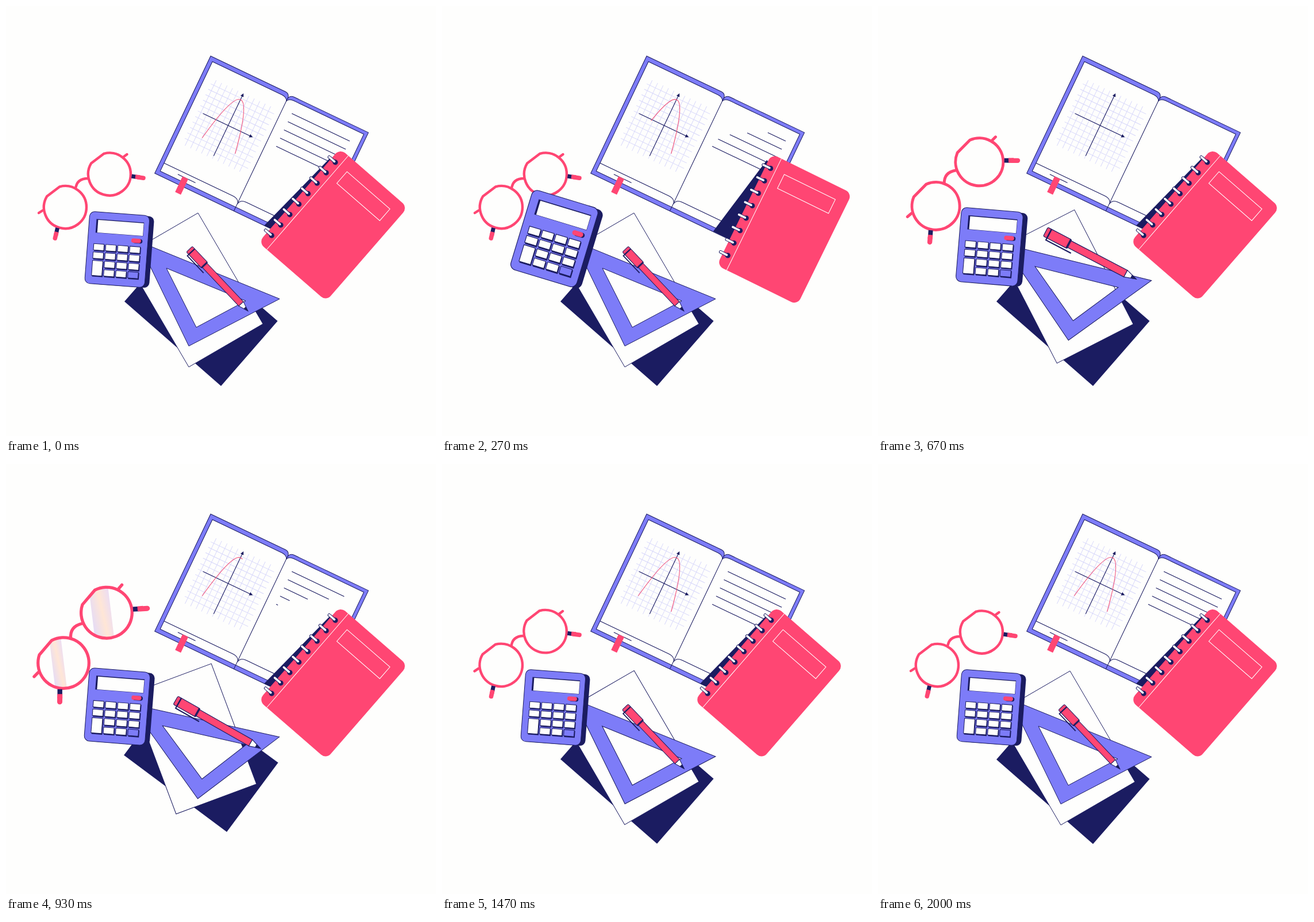
These frames come from a looping animation (748x748 px, 2.03 s). An HTML page:

```html
<!DOCTYPE html>
<html lang="en">
<head>
<meta charset="utf-8">
<title>Study desk</title>
<style>
  html, body { margin: 0; width: 100%; height: 100%; overflow: hidden; background: #fefefd; }
  svg { display: block; width: 100vw; height: 100vh; }
  .navy { fill: #1b1c61; }
  .blue { fill: #7d7cf8; }
  .pink { fill: #ff4673; }
  .white { fill: #fefefd; }
  .edge { stroke: #1b1c61; stroke-width: 1; }
  .line { fill: none; stroke: #1b1c61; stroke-width: 1.1; }
  .rim { fill: none; stroke: #ff4673; stroke-width: 4.4; }
</style>
</head>
<body>
<svg viewBox="0 0 748 748">
  <defs>
    <linearGradient id="shine">
      <stop offset="0" stop-color="#e2dafa"/>
      <stop offset=".55" stop-color="#ffe6d6"/>
      <stop offset="1" stop-color="#eadcf6"/>
    </linearGradient>
    <path id="lens" d="M-31.7-19.1 L-9.6-35.7 A37 37 0 1 1 -31.7-19.1Z"/>
    <clipPath id="lensClip"><use href="#lens"/></clipPath>
  </defs>

  <g transform="translate(356 87) rotate(25.5)">
    <path class="blue edge" d="M0 0H144Q152 0 153 9Q154 2 162 2H305V226H0Z"/>
    <path class="white edge" d="M7 7.5H141Q150 7.5 152.5 14Q155 8 164 8H299V218.5H7Z"/>
    <path class="line" d="M152.5 8V226M7 203H140Q150 203 153 211Q155 203 165 203H299M37 210.3H71"/>
    <rect class="pink" x="46" y="210" width="11" height="30"/>
    <path id="grid" fill="none" stroke="#d6d6fa" stroke-width=".9"/>
    <path class="line" d="M31 96H124M79.5 154.5V38"/>
    <path class="navy" d="M127 96l-6-3v6zM79.5 34l-3 6h6z"/>
    <path id="curve" pathLength="1" fill="none" stroke="#f0567f" stroke-width="1.2" d="M48 135Q79.8-43 111.6 135"/>
    <g id="text"></g>
  </g>

  <polygon id="shade" class="navy"/>

  <g id="notebook">
    <g transform="translate(581 248) rotate(41)">
      <rect class="pink" width="156" height="216" rx="12"/>
      <path fill="none" stroke="#fff" stroke-width="1" d="M19 0V216M35.5 22.3h99v27h-99z"/>
      <g id="rings"></g>
    </g>
  </g>

  <g id="glasses">
    <g transform="translate(103 350)">
      <g clip-path="url(#lensClip)"><path class="glint" fill="url(#shine)" d="M-5-45h17L3 45h-17z"/></g>
      <use href="#lens" class="rim"/>
    </g>
    <g transform="translate(180 292.5)">
      <g clip-path="url(#lensClip)"><path class="glint" fill="url(#shine)" d="M-10-45h28L9 45h-28z"/></g>
      <use href="#lens" class="rim"/>
    </g>
    <path class="rim" d="M121 318Q123 300 142.500 300"/>
    <path class="rim" stroke-linecap="round" d="M205 262l5.500-4M64 355.500l-7 4.500"/>
    <path fill="none" stroke="#1b1c61" stroke-width="7" d="M218.500 296l9 1.500M89.500 386l-2 9"/>
    <path fill="none" stroke="#ff4673" stroke-width="7.500" d="M225 297l8 1M88 393l-1.500 6"/>
    <path fill="none" stroke="#ff4673" stroke-width="7.500" stroke-linecap="round" d="M229 297.800l10 1.500M87 397l-1.700 7"/>
  </g>

  <g id="folder"><path class="navy" d="M206 514L374 661L472.500 548L304 402Z"/></g>
  <g id="sheet"><path class="white edge" d="M334 360L447 553L318 628L205 435Z"/></g>
  <g id="triangle">
    <path class="blue edge" fill-rule="evenodd" d="M229.500 409L476 509.500L318 591.500ZM279 456L331 559L417 513Z"/>
  </g>

  <g id="pen">
    <g transform="translate(319 423) rotate(46.600)">
      <path class="line" stroke-width="1.600" style="stroke-width:1.8" d="M6 5V10.500H47"/>
      <rect class="pink edge" x="36" y="-5.500" width="95" height="11"/>
      <rect class="pink edge" x="0" y="-7.200" width="39" height="14.400" rx="2"/>
      <path class="line" style="stroke-width:2.2" d="M6-7V7M37.500-7V7"/>
      <path class="white edge" d="M131-5.500L148 0L131 5.500Z"/>
      <path class="navy" d="M140-3L149.500 0L140 3Z"/>
    </g>
  </g>

  <g id="calculator">
    <g transform="translate(146 357) rotate(4.300)">
      <rect class="navy" x="8" y="1" width="104.500" height="124.500" rx="9"/>
      <rect class="blue edge" width="104.500" height="125.500" rx="9"/>
      <rect class="navy" x="12.500" y="12.500" width="83" height="24"/>
      <rect class="white" x="15.500" y="14" width="79.500" height="22"/>
      <rect class="navy" x="78" y="42" width="17" height="7.500" rx="3.700"/>
      <rect class="pink" x="75.500" y="41.500" width="17" height="7.500" rx="3.700"/>
      <g id="keys"></g>
    </g>
  </g>
</svg>
<script>
const LOOP = 2030;
const $ = id => document.getElementById(id);
const range = n => [...Array(n).keys()];
const clamp = x => Math.min(1, Math.max(0, x));
const easeOut = x => 1 - (1 - clamp(x)) ** 2;
const easeInOut = x => (x = clamp(x)) < .5 ? 2 * x * x : 1 - 2 * (1 - x) ** 2;

$('grid').setAttribute('d',
  range(11).map(i => `M${27 + i * 10.5} 34V160`).join('') +
  range(11).map(i => `M21 ${43.5 + i * 10.5}H143`).join(''));

$('text').innerHTML = range(5).map(i =>
  `<path class="line" pathLength="1" d="M170.5 ${29.5 + i * 15.8}h111.5"/>`).join('');

$('rings').innerHTML = range(8).map(i => `<g transform="translate(9.500 ${23.4 + i * 24.1})" stroke-linecap="round">
  <circle class="navy" r="4.600"/>
  <path d="M-14 0H-2" stroke="#1b1c61" stroke-width="5.500"/>
  <path d="M-14 0H-2" stroke="#fff" stroke-width="3.600"/></g>`).join('');

const key = (col, row, height = 11, fill = 'white') => {
  const x = 11 + col * 21, y = 55.5 + row * 14.7;
  return `<rect class="navy" x="${x + 1}" y="${y + 1}" width="18.500" height="${height + 1}"/>
    <rect class="${fill} edge" x="${x}" y="${y}" width="18" height="${height}"/>`;
};
$('keys').innerHTML = range(16).map(i => {
  const col = i % 4, row = i >> 2;
  if (col === 0 && row === 3) return '';
  if (col === 0 && row === 2) return key(0, 2, 26);
  return key(col, row, 11, i === 15 ? 'blue' : 'white');
}).join('');

// Monotone cubic interpolation through rows of [time, ...values].
function sample(rows, t) {
  const last = rows.length - 1;
  if (t <= rows[0][0]) return rows[0].slice(1);
  if (t >= rows[last][0]) return rows[last].slice(1);
  const i = rows.findIndex(row => row[0] > t) - 1;
  const span = rows[i + 1][0] - rows[i][0], x = (t - rows[i][0]) / span;
  return rows[0].slice(1).map((_, n) => {
    const c = n + 1;
    const slope = j => (rows[j + 1][c] - rows[j][c]) / (rows[j + 1][0] - rows[j][0]);
    const tangent = j => {
      if (j === 0 || j === last) return 0;
      const a = slope(j - 1), b = slope(j);
      return a * b > 0 ? 2 * a * b / (a + b) : 0;
    };
    const from = rows[i][c], to = rows[i + 1][c];
    return from + (to - from) * x * x * (3 - 2 * x)
      + span * x * (1 - x) * (tangent(i) * (1 - x) - tangent(i + 1) * x);
  });
}

// Each key: time, shift x, shift y, rotation, scale.
const rest = t => [t, 0, 0, 0, 1];
const movers = {
  notebook: { at: [569, 380.7], keys: [rest(30), [285, 27, 8, -15, 1], rest(660)] },
  calculator: { at: [193.5, 423.5], keys: [rest(30), [285, 2, -19, 12.7, 1.15],
    [670, .5, -4.5, .5, 1.03], [930, 0, -1.5, .2, 1.015], [1170, 0, -.4, 0, 1.003], rest(1500)] },
  glasses: { at: [141.5, 321.2], keys: [rest(480), [670, -3, -11.7, -8.6, 1.122],
    [910, -4, -19.2, -12.7, 1.2], [1170, -2.5, -1.2, -6.8, 1.064], [1470, -.3, -.8, -.6, 1.006], rest(1800)] },
  pen: { at: [370, 477], keys: [rest(300), [670, .5, -43, -19, 1.2],
    [930, -1, -24, -17, 1.145], [1170, -.5, -8, -5.5, 1.045], [1470, 0, -.4, -.3, 1.003], rest(1650)] },
  triangle: { at: [397, 550.5], keys: [rest(400), [670, 6.5, -21, -8.3, 1],
    [810, 8, -24.5, -10.4, 1], [930, 7.5, -22, -9.7, 1], [1170, 1.5, -6, -2.2, 1], [1470, 0, -.5, -.2, 1], rest(1650)] },
  sheet: { at: [326, 494], keys: [rest(520), [670, .5, -6, 3.1, 1],
    [920, .5, -16, 9.8, 1], [1170, 0, -5, .8, 1], [1470, 0, -.6, .1, 1], rest(1650)] },
  folder: { at: [339, 531], keys: [rest(670), [920, 0, -18, -4.5, 1],
    [1170, 0, -3.5, -.3, 1], [1470, 0, -.5, 0, 1], rest(1650)] }
};

function trim(path, from, to) {
  path.style.visibility = to - from > .001 ? 'visible' : 'hidden';
  path.style.strokeDasharray = `0 ${from} ${to - from} 2`;
}

const textLines = [...$('text').children];
const glints = [...document.querySelectorAll('.glint')];

function draw(t) {
  for (const [id, { at: [x, y], keys }] of Object.entries(movers)) {
    const [dx, dy, angle, scale] = sample(keys, t);
    $(id).setAttribute('transform',
      `translate(${x + dx} ${y + dy}) rotate(${angle}) scale(${scale}) translate(${-x} ${-y})`);
  }

  const swing = sample(movers.notebook.keys, t)[2] / -15;
  $('shade').setAttribute('points',
    `${566 - swing} ${262 + 6 * swing} ${449 + 23 * swing} ${382 + 10 * swing} 534 423 585 290`);

  const writing = t > 700;
  textLines.forEach((line, i) => writing
    ? trim(line, 0, easeInOut((t - 707 - i * 47) / 285))
    : trim(line, easeInOut((t - 97 - i * 45) / 285), 1));
  if (writing) trim($('curve'), 0, easeOut((t - 734) / 637));
  else trim($('curve'), easeInOut((t - 97) / 560), 1);

  const sweep = -7 + (t - 930) * .35;
  glints.forEach(glint => glint.setAttribute('transform', `translate(${sweep} 0)`));
}

let start;
function tick(now) {
  start ??= now;
  draw((now - start) % LOOP);
  requestAnimationFrame(tick);
}
draw(0);
requestAnimationFrame(tick);
</script>
</body>
</html>
```
